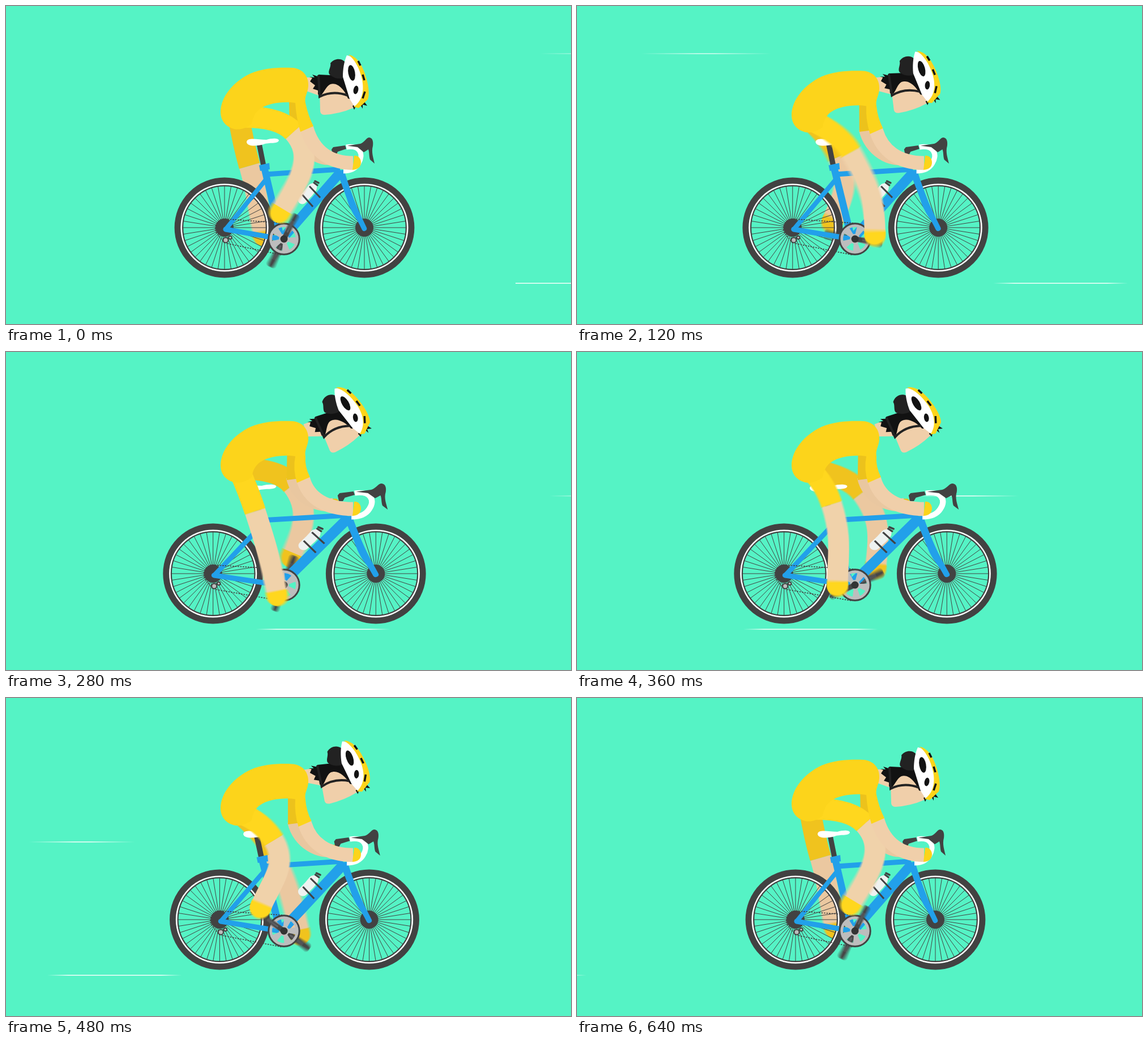
An HTML page with a canvas that plays this animation: 998x561 px, repeating every 680 ms.

```html
<!DOCTYPE html>
<html lang="en">
<head>
<meta charset="utf-8">
<title>Cyclist</title>
<style>
  html, body { margin: 0; width: 998px; height: 561px; overflow: hidden; background: #55f3c5; }
  canvas { display: block; }
</style>
</head>
<body>
<canvas id="stage" width="998" height="561"></canvas>
<script>
const W = 998, H = 561, LOOP = 680, STEP = 40, CYCLE = 640;
const BG = '#55f3c5', YELLOW = '#fcd41b', YELLOW_FAR = '#ecc21c', SKIN = '#f0cfaa', SKIN_FAR = '#e9c7a0',
      BLUE = '#22a0ea', DARK = '#424242', BLACK = '#121212', GREY = '#bdbdbd', WHITE = '#fff';
const RAD = Math.PI / 180, TAU = Math.PI * 2;
const BB = [491, 411], MID = 509.5, HUB_Y = 391;

const stage = document.getElementById('stage').getContext('2d');
const makeLayer = () => Object.assign(document.createElement('canvas'), { width: W, height: H }).getContext('2d');
const layer = makeLayer(), blend = makeLayer();

// time, shorts hem x, y, heading, foot offset from pedal x, y, foot heading
const NEAR_LEG = [
  [0, 508, 222, 48, -25, -11, 121],
  [120, 484, 258, 61, -4, -13, 90],
  [200, 455, 284, 70, 0, -18, 76],
  [280, 440, 281, 72, 2, -19, 79],
  [400, 457, 262, 71, 5, -14, 98],
  [480, 473, 251, 59, -9, -18, 113]
];
const FAR_LEG = [
  [0, 430, 282, 74, -18, -42, 78],
  [120, 462, 266, 65, -1, -23, 113],
  [200, 497, 243, 66, 0, -18, 116],
  [280, 506, 235, 52, -1, -12, 113],
  [400, 498, 257, 55, 0, -14, 88],
  [480, 472, 273, 65, -5, -17, 78]
];

const P = d => new Path2D(d);
const SADDLE = P('M425 240C426 231 445 236 460 236C470 233 481 233 482 237C480 244 465 240 455 244C445 247 426 249 425 240Z');
const STEM = P('M575 253L578 249L599 246L601 252L586 257L583 263L577 263Z');
const LEVER = P('M603 246.5L626 243C634 240 636 232 642 232C648 233 649 240 648 247C645 258 649 268 651 278L643 271C641 264 642 258 640 253L632 258L621 249Z');
const DROP = P('M601 249C626 245 632 262 623 277C617 288 607 291 596 291');
const FORK = P('M584 290L597 289C607 322 616 347 628 372L637 391A4.5 4.5 0 0 1 629 395C619 372 610 367 602 340Z');
const NECK = P('M528 126L550 126L558 160L528 149Z');
const FACE = P('M554 148L555 186Q556 192 563 192Q590 190 613 180L620 165L602 130L568 130Z');
const HAIR = P('M537 133L541 127L536 125L545 126L541 121L550 124L552 121L573 122L592 118L612 166L604 163C598 148 586 134 573 138C566 141 562 152 557 157L551 156L551 149L542 146L546 140Z');
const HELMET_BACK = P('M573 101C580 92 592 92 598 98L602 126C590 130 580 128 573 122C566 117 575 108 573 101Z');
const SHELL = P('M602 87C597 98 595 112 595 125L607 164L616 178C632 176 638 150 633 130C628 108 618 90 602 87Z');
const STRIPE = P('M605 86C621 88 632 108 638 133C642 150 641 160 639 165L623 180L614 178C629 168 633 150 629 130C624 108 616 95 605 86Z');
const SPIKES = P('M612 176L615 183L618 177L627 176L630 181L630 174L638 176L633 169Z');

const pulse = t => 1 - Math.abs((t % CYCLE) - CYCLE / 2) / (CYCLE / 2);
const stretch = u => u * u * (1.87 - .87 * u);
const crankAngle = t => (-63.5 + .5625 * t + 17 * Math.sin(Math.PI * t / CYCLE) ** 2) * RAD;
const polar = (x, y, r, a) => [x + r * Math.cos(a), y + r * Math.sin(a)];
const wrap = t => (t % CYCLE + CYCLE) % CYCLE;

// Smooth periodic interpolation through the rows of keys.
function pose(keys, time) {
  const t = wrap(time), n = keys.length;
  const row = i => keys[(i + n) % n];
  const when = i => row(i)[0] + Math.floor(i / n) * CYCLE;
  let i = n - 1;
  while (keys[i][0] > t) i--;
  const span = when(i + 1) - when(i), s = (t - when(i)) / span;
  return keys[0].map((_, c) => {
    const a = row(i)[c], b = row(i + 1)[c];
    const ma = (b - row(i - 1)[c]) / (when(i + 1) - when(i - 1)) * span;
    const mb = (row(i + 2)[c] - a) / (when(i + 2) - when(i)) * span;
    return a * (1 + 2 * s) * (1 - s) ** 2 + ma * s * (1 - s) ** 2
      + b * s * s * (3 - 2 * s) + mb * s * s * (s - 1);
  });
}

function stroke(g, color, width, path, cap = 'butt') {
  g.strokeStyle = color;
  g.lineWidth = width;
  g.lineCap = cap;
  g.stroke(path);
}
function fill(g, color, path, rule = 'nonzero') {
  g.fillStyle = color;
  g.fill(path, rule);
}
function line(g, color, width, x1, y1, x2, y2, cap) {
  stroke(g, color, width, P(`M${x1} ${y1}L${x2} ${y2}`), cap);
}
function disc(g, color, x, y, rx, ry = rx, turn = 0) {
  const p = new Path2D();
  p.ellipse(x, y, rx, ry, turn, 0, TAU);
  fill(g, color, p);
}
function ring(g, color, width, x, y, r) {
  const p = new Path2D();
  p.arc(x, y, r, 0, TAU);
  stroke(g, color, width, p);
}

// Averages several moments around t, like a camera shutter.
function blurred(t, draw) {
  blend.clearRect(0, 0, W, H);
  blend.globalCompositeOperation = 'lighter';
  blend.globalAlpha = .2;
  for (let i = -2; i <= 2; i++) {
    layer.clearRect(0, 0, W, H);
    draw(layer, t + i * 4);
    blend.drawImage(layer.canvas, 0, 0);
  }
  stage.drawImage(blend.canvas, 0, 0);
}

function leg(g, t, keys, side, hipY, yellow, skin) {
  const [, mx, my, am, ox, oy, af] = pose(keys, t);
  const [px, py] = polar(...BB, 40, crankAngle(wrap(t)) + side);
  const fx = px + ox, fy = py + oy, k = Math.hypot(fx - mx, fy - my) * .42, toe = af * RAD;
  const c0 = polar(mx, my, -38, am * RAD), c1 = polar(mx, my, k, am * RAD);
  const c2 = polar(fx, fy, -k, toe), cuff = polar(fx, fy, -8, toe);
  stroke(g, skin, 37, P(`M${mx} ${my}C${c1} ${c2} ${fx} ${fy}`));
  stroke(g, yellow, 38, P(`M411 ${hipY}Q${c0} ${mx} ${my}`));
  const foot = new Path2D();
  foot.arc(fx, fy, 19, toe - Math.PI / 2, toe + Math.PI / 2);
  foot.lineTo(...polar(...cuff, 19, toe + Math.PI / 2));
  foot.lineTo(...polar(...cuff, 19, toe - Math.PI / 2));
  fill(g, yellow, foot);
}

function arm(g, t, side, length, width) {
  const a = crankAngle(wrap(t)) + side;
  line(g, DARK, width, ...BB, ...polar(...BB, length, a), 'round');
  line(g, '#66696b', 2.5, ...polar(...BB, 14, a), ...polar(...BB, length - 10, a), 'round');
}

function wheel(g, x) {
  const spokes = new Path2D(), count = 40;
  for (let i = 0; i < count; i++) {
    spokes.moveTo(...polar(x, HUB_Y, 14, i * TAU / count));
    spokes.lineTo(...polar(x, HUB_Y, 74, i * TAU / count));
  }
  stroke(g, DARK, 1, spokes);
  ring(g, DARK, 2.5, x, HUB_Y, 74);
  ring(g, WHITE, 3, x, HUB_Y, 76.5);
  ring(g, DARK, 10.8, x, HUB_Y, 83);
  disc(g, DARK, x, HUB_Y, 16);
}

function bottle(g) {
  line(g, '#eef2f0', 16, 523.5, 341.5, 532, 332, 'round');
  line(g, '#eef2f0', 16, 534, 330, 541, 321, 'round');
  line(g, '#eef2f0', 10, 541, 321, 546, 315);
  line(g, DARK, 3, 543, 311, 551, 317);
  line(g, DARK, 3.5, 546, 309, 552, 312, 'round');
  line(g, DARK, 3, 523.5, 333, 542, 354);
  line(g, DARK, 3, 536, 318, 555, 338);
}

function frame(g, sx) {
  g.save();
  g.translate(MID, 0);
  g.scale(sx, 1);
  g.translate(-MID, 0);
  line(g, DARK, 9, 447, 242, 455, 282);
  line(g, BLUE, 8, 388, 394, 460, 305, 'round');
  line(g, BLUE, 9, 388, 394, 486, 411, 'round');
  line(g, BLUE, 12, 456, 284, 486, 411);
  line(g, BLUE, 9, 459, 297, 590, 288);
  line(g, BLUE, 17, 591, 293, 493, 405);
  bottle(g);
  fill(g, BLUE, P('M447 281L465 277L466 288L449 291Z'));
  fill(g, BLUE, FORK);
  fill(g, WHITE, SADDLE);
  fill(g, DARK, STEM);
  stroke(g, WHITE, 9, DROP);
  fill(g, DARK, LEVER);
  g.restore();
}

function drivetrain(g, x, t) {
  g.setLineDash([2.5, 2]);
  stroke(g, DARK, 1.6, P(`M488 383L${x + 5} 376A17 17 0 0 0 ${x - 14} 401L${x} 418`));
  stroke(g, DARK, 1.6, P(`M${x + 5} 419L486 439`));
  g.setLineDash([]);
  for (const [dx, y, r] of [[2, 413, 4.5], [10, 408.5, 2.8]]) {
    disc(g, GREY, x + dx, y, r);
    ring(g, DARK, 2, x + dx, y, r);
  }
  const plate = new Path2D(), turn = crankAngle(t);
  plate.arc(...BB, 27, 0, TAU);
  for (let i = 0; i < 5; i++) {
    const a = turn + (i + .5) * TAU / 5;
    plate.moveTo(...polar(...BB, 9, a - .22));
    plate.arc(...BB, 21, a - .32, a + .32);
    plate.lineTo(...polar(...BB, 9, a + .22));
    plate.closePath();
  }
  fill(g, GREY, plate, 'evenodd');
  ring(g, DARK, 3, ...BB, 27.2);
}

function head(g, turn) {
  g.save();
  g.translate(531, 134);
  g.rotate(turn * RAD);
  g.translate(-531, -134);
  fill(g, SKIN, NECK);
  fill(g, SKIN, FACE);
  fill(g, BLACK, HAIR);
  fill(g, '#222', HELMET_BACK);
  fill(g, BLACK, SPIKES);
  stroke(g, '#222', 4, P('M552 122L554 160C566 154 582 150 604 158'));
  fill(g, WHITE, SHELL);
  fill(g, YELLOW, STRIPE);
  disc(g, BLACK, 610.5, 118, 6, 14, -.17);
  disc(g, BLACK, 618, 148, 4.3, 7.5, .2);
  line(g, BLACK, 3.5, 622, 97, 626, 105);
  line(g, BLACK, 3.5, 630, 121, 633, 131);
  line(g, BLACK, 3.5, 634, 151, 630, 163);
  g.restore();
}

function torso(g, s, ex, ey) {
  const y = v => v + s;
  fill(g, YELLOW, P(`M379 ${y(187)}C379 ${y(160)} 402 ${y(133)} 432 ${y(119)}C455 ${y(109)} 485 ${y(108)} 505 ${y(109)}
    C525 ${y(110)} 535 ${y(125)} 534 ${y(141)}C533 ${y(155)} 527 ${y(158)} 529 ${y(171)}
    Q${ex + 2} ${ey - 24} ${ex + 11.5} ${ey - 5}L${ex - 11.5} ${ey + 5}Q${ex - 19} ${ey - 20} 511 ${y(171)}
    C495 ${y(168)} 464 ${y(170)} 448 ${y(182)}C440 ${y(188)} 436 ${y(196)} 434 ${y(208)}
    C425 ${y(216)} 410 ${y(220)} 400 ${y(216)}C387 ${y(212)} 379 ${y(201)} 379 ${y(187)}Z`));
}

// A white dash whose ends fade over the distance it moves while the shutter is open.
function streak(g, x, y, length, fade, height) {
  const grad = g.createLinearGradient(x, 0, x + length, 0), f = fade / length;
  const clear = 'rgba(255,255,255,0)', full = 'rgba(255,255,255,.95)';
  if (f > 0) grad.addColorStop(0, clear);
  grad.addColorStop(f, full);
  grad.addColorStop(1 - f, full);
  if (f > 0) grad.addColorStop(1, clear);
  g.fillStyle = grad;
  g.fillRect(x, y, length, height);
}

function streaks(g, t) {
  const ramp = Math.min(t, 81), speed = 1.84 * ramp / 81, fade = speed * 20;
  const lowX = 900 - 1.84 * (ramp * ramp / 162 + t - ramp);
  streak(g, lowX - fade / 2, 488.4, 201 + fade, fade, 1.5);
  streak(g, 943 - 6.92 * t, 83.5, 230, 100, 1.2);
  streak(g, 960 - 4.6 * (t - 280), 253.2, 188, 80, 1.5);
}

function render(time) {
  const g = stage, t = time % CYCLE, u = pulse(t), p = stretch(u), d = 23.9 * p;
  const s = 14.8 * u, hipY = 196 + s * .8, rear = 386 - d, front = 633 + d;
  const ex = 531.5 - 7 * u, ey = 217 + 10 * u;

  g.fillStyle = BG;
  g.fillRect(0, 0, W, H);
  streaks(g, time);

  blurred(t, (l, at) => leg(l, at, FAR_LEG, Math.PI, hipY, YELLOW_FAR, SKIN_FAR));
  const fx = 511 - 6 * u, fy = 214 + 8 * u;
  stroke(g, SKIN_FAR, 22, P(`M${fx} ${fy}C${fx + 8} ${fy + 38} 555 276 580 268`));
  disc(g, YELLOW_FAR, 581, 266, 7.5);
  fill(g, YELLOW_FAR, P(`M${500 - 4 * u} ${165 + s}L518 ${165 + s}L${fx + 13} ${fy + 2}L${fx - 10} ${fy + 5}Z`));

  wheel(g, rear);
  wheel(g, front);
  blurred(t, (l, at) => arm(l, at, Math.PI, 50, 11));
  frame(g, 1 + d / 123.5);
  drivetrain(g, rear, t);
  blurred(t, (l, at) => arm(l, at, 0, 45, 9));
  disc(g, '#333', ...BB, 6.5);

  blurred(t, (l, at) => leg(l, at, NEAR_LEG, 0, hipY, YELLOW, SKIN));
  head(g, -24.7 * p);
  stroke(g, SKIN, 24.5, P(`M${ex - 2} ${ey - 5}L${ex} ${ey}C${ex + 10} ${ey + 33} 566 277 613 277`));
  fill(g, YELLOW, P('M615 264C622 263 627 269 627 276C627 284 621 289 612 289Z'));
  torso(g, s, ex, ey);
}

function tick() {
  render(Math.floor(performance.now() % LOOP / STEP) * STEP);
  requestAnimationFrame(tick);
}
tick();
</script>
</body>
</html>
```
